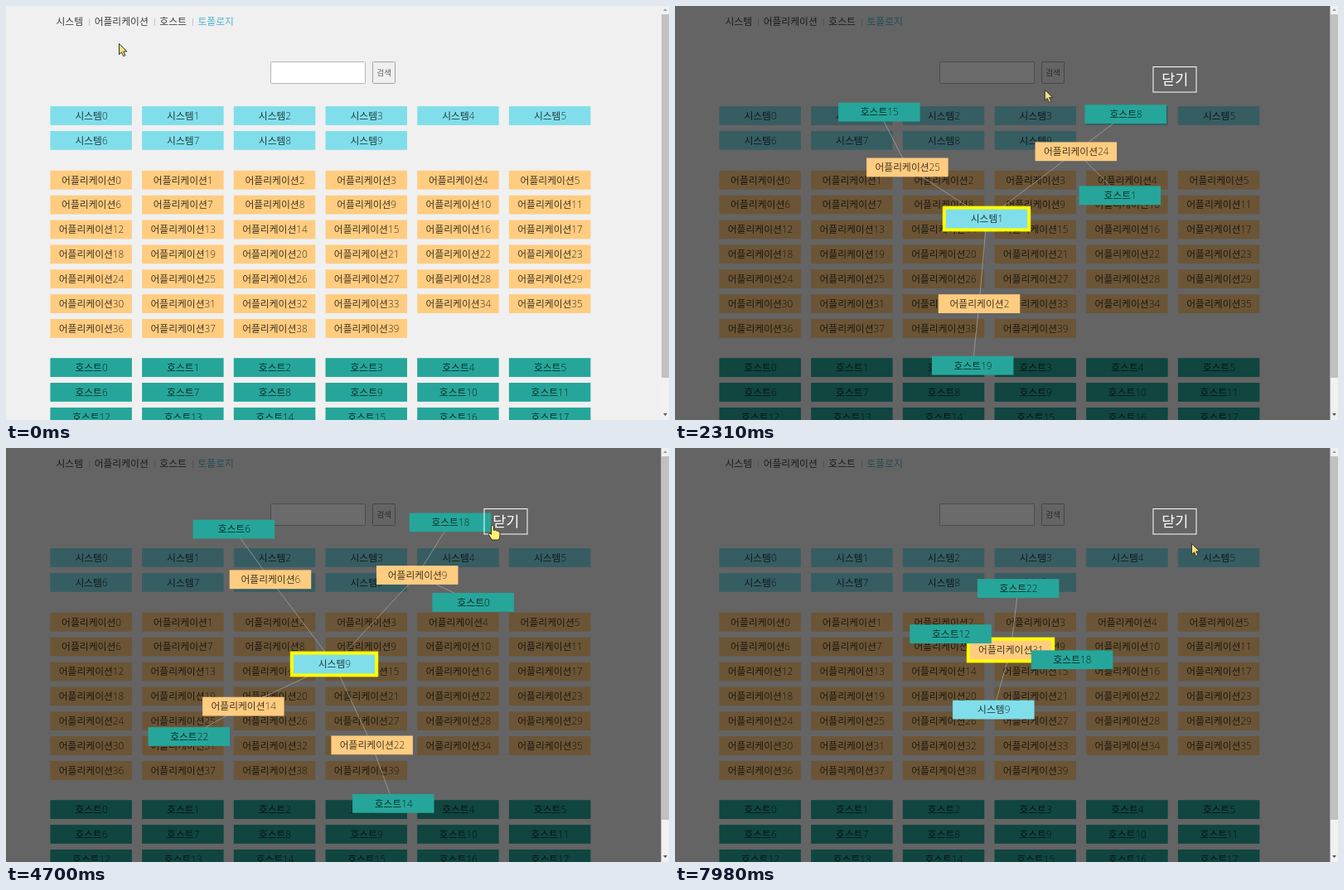
Write an HTML page that moves like this. It is 800 px wide and 500 px high and loops after 8 s.

```html
<!DOCTYPE html>
<html lang="ko">
<head>
<meta charset="utf-8">
<style>
  html, body { margin: 0; width: 100%; height: 100%; overflow: hidden; background: #f0f0f0; }
  svg { display: block; width: 800px; height: 500px; }
  text { font: 300 11.8px "Open Sans", "Noto Sans CJK KR", "Noto Sans CJK", sans-serif; fill: #000; fill-opacity: .74; }
  .mid { text-anchor: middle; }
</style>
</head>
<body>
<svg id="stage" viewBox="0 0 800 500"></svg>
<script>
const LOOP = 8000, FADE = 250, LINK = 75;
const TILE = { width: 98.5, height: 22.8, stepX: 110.7, stepY: 29.87, left: 53.4 };
const CLOSE = { x: 577, y: 73.5, width: 52, height: 30.5 };
const KINDS = {
  S: { name: '시스템', color: '#80deea' },
  A: { name: '어플리케이션', color: '#ffcc80' },
  H: { name: '호스트', color: '#26a69a' }
};

// A node hangs off its parent at an angle in degrees and a distance.
const node = (id, angle, reach, ...children) => ({ id, angle, reach, children });
const host = (number, angle) => node('H' + number, angle, LINK);

const GRAPHS = [
  { open: 1070, close: 2870, spread: 410, swing: 31, x: 376, y: 257, root:
    node('S1', 0, 0,
      node('A25', -147, 114, host(15, -117)),
      node('A24', -37, 135, host(8, -37), host(1, 45)),
      node('A2', 95, 103, host(19, 96))) },
  { open: 3870, close: 4950, spread: 830, swing: 0, x: 396, y: 261, root:
    node('S9', 0, 0,
      node('A6', -127, 128, host(6, -126)),
      node('A9', -47, 147, host(18, -58), host(0, 26)),
      node('A14', 155, 121, host(22, 151)),
      node('A22', 65, 108, host(14, 70))) },
  { open: 7010, close: 9000, spread: 830, swing: 0, x: 405, y: 244, root:
    node('A31', 0, 0,
      node('S9', 106, LINK), host(22, -83), host(12, 195), host(18, 9)) }
];

const HOME = { x: 136, y: 45 };
const MOVES = [
  { from: 400, to: 880, x: 192, y: 137 },
  { from: 1820, to: 2590, x: 590, y: 80 },
  { from: 2900, to: 3520, x: 455, y: 158 },
  { from: 4180, to: 4620, x: 587, y: 93 },
  { from: 5860, to: 6480, x: 194, y: 384 },
  { from: 6620, to: 6820, x: 195, y: 361 },
  { from: 7300, to: 7980, x: 623, y: 115 }
];

const stage = document.getElementById('stage');
const tiles = [];
const clamp = v => Math.min(1, Math.max(0, v));
const mix = (a, b, p) => a + (b - a) * p;
const easeOut = (u, power) => 1 - (1 - clamp(u)) ** power;
const inside = (p, r) => p.x >= r.x && p.x <= r.x + r.width && p.y >= r.y && p.y <= r.y + r.height;
const set = (el, attrs) => { for (const k in attrs) el.setAttribute(k, attrs[k]); return el; };

function add(parent, tag, attrs = {}, text = '') {
  const el = set(document.createElementNS('http://www.w3.org/2000/svg', tag), attrs);
  el.textContent = text;
  return parent.appendChild(el);
}
const rect = (parent, x, y, width, height, fill, extra) =>
  add(parent, 'rect', { x, y, width, height, fill, ...extra });
const label = (parent, x, y, text, style = '', cls = 'mid') =>
  add(parent, 'text', { x, y, style, class: cls }, text);

function tile(parent, x, y, id) {
  const { name, color } = KINDS[id[0]];
  rect(parent, x, y, TILE.width, TILE.height, color);
  label(parent, x + TILE.width / 2 + 0.4, y + 15.7, name + id.slice(1));
}

function grid(kind, count, top) {
  for (let i = 0; i < count; i++) {
    const x = TILE.left + TILE.stepX * (i % 6);
    const y = top + TILE.stepY * Math.floor(i / 6);
    tile(stage, x, y, kind + i);
    tiles.push({ x, y, width: TILE.width, height: TILE.height });
  }
}

function buildPage() {
  rect(stage, 0, 0, 800, 500, '#f0f0f0');
  let x = 60.5;
  for (const text of ['시스템', '어플리케이션', '호스트', '토폴로지']) {
    const last = text === '토폴로지';
    label(stage, x, 23, text, last ? 'fill:#3fb0cc;fill-opacity:.9' : '', '');
    x += text.length * 10.85 + 13.6;
    if (!last) rect(stage, x - 6.5, 15, 1, 9, '#c4c4c4');
  }
  rect(stage, 319.5, 67.5, 114, 26, '#fff', { stroke: '#b4b4b4', rx: 1 });
  rect(stage, 442.5, 67.5, 27, 26, '#efefef', { stroke: '#a4a4a4', rx: 1 });
  label(stage, 456.3, 84.3, '검색', 'font-size:9.5px;fill-opacity:.6');
  grid('S', 10, 121.1);
  grid('A', 40, 198.8);
  grid('H', 18, 425.2);
  rect(stage, 791, 0, 9, 500, '#f1f1f1');
  rect(stage, 791, 10, 9, 439, '#c1c1c1');
  add(stage, 'path', { d: 'M793 6L795.5 3L798 6Z', fill: '#a3a3a3' });
  add(stage, 'path', { d: 'M793 492L795.5 495L798 492Z', fill: '#505050' });
}

// Lists the nodes level by level, so deeper nodes lie on top.
function flatten(root) {
  const list = [root];
  for (const parent of list) {
    for (const child of parent.children) list.push(Object.assign(child, { parent }));
  }
  return list;
}

function buildGraph(graph) {
  graph.nodes = flatten(graph.root);
  graph.layer = add(stage, 'g');
  rect(graph.layer, 0, 0, 790.5, 500, '#000', { 'fill-opacity': 0.58 });
  for (const n of graph.nodes) {
    if (n.parent) n.line = add(graph.layer, 'line', { stroke: '#aaa', 'stroke-opacity': 0.7 });
  }
  for (const n of graph.nodes) {
    n.box = add(graph.layer, 'g');
    if (!n.parent) rect(n.box, -53.2, -15.4, 106.4, 30.8, '#ff0');
    tile(n.box, -TILE.width / 2, -TILE.height / 2, n.id);
  }
  rect(graph.layer, CLOSE.x, CLOSE.y, CLOSE.width, CLOSE.height, 'none', { stroke: '#fff' });
  label(graph.layer, 603.3, 95.2, '닫기', 'font-size:17.5px;font-weight:400;fill:#fff;fill-opacity:1');
}

function drawGraph(graph, time) {
  const age = time - graph.open;
  const opacity = Math.min(clamp(age / FADE), clamp(1 - (time - graph.close) / FADE));
  graph.layer.style.display = opacity > 0 ? '' : 'none';
  if (opacity <= 0) return;
  graph.layer.style.opacity = opacity;

  const grow = mix(0.2, 1, easeOut(age / graph.spread, 3));
  const turn = graph.swing * (1 - easeOut((age - graph.spread) / 830, 2));
  for (const n of graph.nodes) {
    const angle = (n.angle + turn) * Math.PI / 180;
    const origin = n.parent || graph;
    n.x = origin.x + Math.cos(angle) * n.reach * grow;
    n.y = origin.y + Math.sin(angle) * n.reach * grow;
    set(n.box, { transform: `translate(${n.x} ${n.y})` });
    if (n.line) set(n.line, { x1: origin.x, y1: origin.y, x2: n.x, y2: n.y });
  }
}

function drawPointer(time) {
  let spot = HOME;
  for (const move of MOVES) {
    const p = clamp((time - move.from) / (move.to - move.from));
    spot = { x: mix(spot.x, move.x, p), y: mix(spot.y, move.y, p) };
  }
  const covered = GRAPHS.some(g => time >= g.open && time < g.close);
  const isHand = (covered ? [CLOSE] : tiles).some(area => inside(spot, area));
  set(pointer, { transform: `translate(${spot.x} ${spot.y})` });
  arrow.style.display = isHand ? 'none' : '';
  hand.style.display = isHand ? '' : 'none';
}

buildPage();
GRAPHS.forEach(buildGraph);
const pointer = add(stage, 'g', { stroke: '#333', 'stroke-linejoin': 'round' });
const arrow = add(pointer, 'path', {
  fill: '#f7df7c', d: 'M.5 .5V13.5L3.5 10.8L5.7 15.6L8 14.6L5.8 9.9H10Z'
});
const hand = add(pointer, 'path', {
  fill: '#fff176',
  d: 'M-1.5 10V1.7Q-1.5 .5 0 .5T1.5 1.7V6.3Q4 5.3 4.8 7Q6.7 6.2 7.3 8Q9 8 9 10V13Q8.8 16 7.3 18H-.5Q-2.8 15 -4.6 11.5Q-4.8 9.4 -3 10.2L-1.5 11.5Z'
});

const start = performance.now();
function frame() {
  const time = (performance.now() - start) % LOOP;
  GRAPHS.forEach(graph => drawGraph(graph, time));
  drawPointer(time);
  requestAnimationFrame(frame);
}
frame();
</script>
</body>
</html>
```
